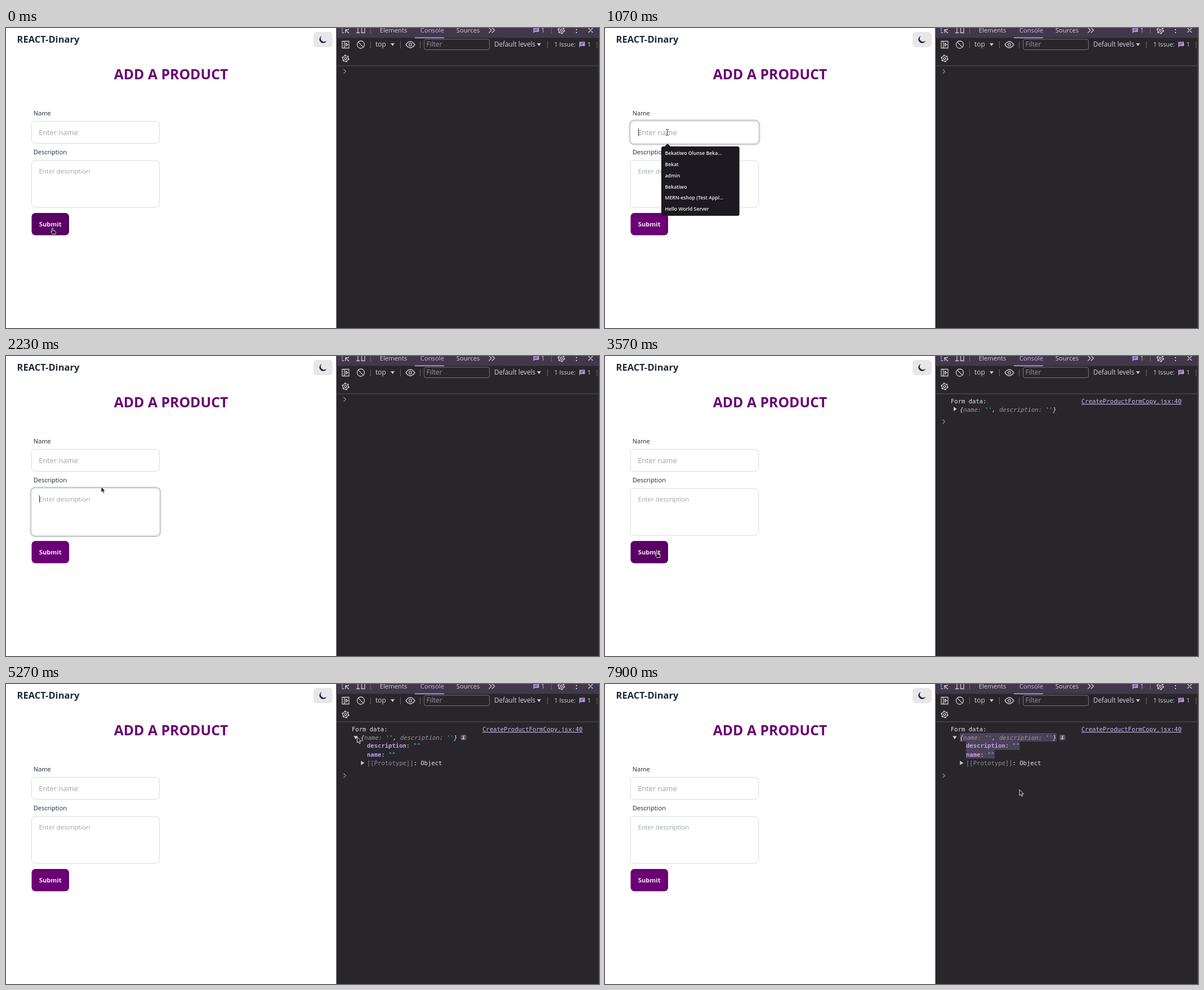
Recreate the animation shown at these times as an HTML page. Size 1053 by 532 pixels, loop 8000 ms.

```html
<!DOCTYPE html>
<html lang="en">
<head>
<meta charset="utf-8">
<title>Add a product</title>
<style>
html, body { margin: 0; width: 100%; height: 100%; overflow: hidden; background: #fff; }
svg { display: block; font-family: "Open Sans", "Noto Sans", sans-serif; }
.mono { font: 10.56px "DejaVu Sans Mono", monospace; white-space: pre; fill: #e6e3e8; }
.line { fill: none; stroke: #cfc8d6; stroke-width: 1.3; }
.rule { stroke: #67606d; }
.field { fill: #fff; stroke: #d8dbe0; }
.ring { fill: none; stroke: #c4c6cb; stroke-width: 1.8; }
.hint { fill: #9ca3af; }
.key { fill: #9a949f; }
.str { fill: #55bdec; }
.prop { fill: #bf9fef; font-weight: bold; }
</style>
</head>
<body>
<svg width="1053" height="532" viewBox="0 0 1053 532">
  <defs>
    <g id="gear" class="line">
      <circle r="4.8"/><circle r="1.9"/>
      <circle r="6" stroke-dasharray="2.8 3.483"/>
    </g>
    <g id="bubble">
      <path d="M0 0h10v7.6h-7.6l-2.4 2.4z" fill="#b497de"/>
      <path d="M2 2.5h6M2 5h4" stroke="#3b3145"/>
    </g>
    <path id="down" d="M0 0h7l-3.5 5z" fill="#cfc8d6"/>
  </defs>

  <!-- page -->
  <rect width="1053" height="532" fill="#fff"/>
  <text x="19.5" y="26" font-size="16.5" font-weight="700" fill="#1f2937">REACT-Dinary</text>
  <rect x="546" y="7" width="34" height="27" rx="6" fill="#e7e7e9"/>
  <path d="M560.6 14a6.6 6.6 0 1 0 8.6 8.6a6 6 0 0 1-8.6-8.6z" fill="#1f2940"/>
  <text x="293" y="90.5" font-size="24.8" font-weight="700" text-anchor="middle" fill="#6b0075">ADD A PRODUCT</text>
  <g font-size="11.1" font-weight="500" fill="#1f2937">
    <text x="48.7" y="155">Name</text>
    <text x="48.7" y="224">Description</text>
  </g>
  <rect class="field" x="45.5" y="165.5" width="227" height="39" rx="6.5"/>
  <rect class="field" x="45.5" y="235" width="227" height="83" rx="6.5"/>
  <text class="hint" x="58.3" y="189.5" font-size="12.8">Enter name</text>
  <text class="hint" x="58.5" y="258" font-size="11.4">Enter description</text>
  <rect id="nameRing" class="ring" x="43.5" y="163.5" width="231" height="43" rx="8.5"/>
  <rect id="textRing" class="ring" x="43.5" y="233" width="231" height="87" rx="8.5"/>
  <path id="nameCaret" d="M59.5 178v14" stroke="#333"/>
  <path id="textCaret" d="M59.5 247v13" stroke="#333"/>
  <rect id="button" x="45.5" y="328" width="66.5" height="39.5" rx="6.5"/>
  <text x="78.7" y="352.3" font-size="11.2" font-weight="700" text-anchor="middle" fill="#f1e4f3">Submit</text>
  <g id="popup" font-size="8.7" font-weight="600" fill="#f1eff3">
    <path d="M105.5 210.5l5.5-5.5 5.5 5.5z" fill="#1c1a20"/>
    <rect x="100" y="210" width="138.7" height="123" rx="3.5" fill="#1c1a20"/>
  </g>

  <!-- developer tools -->
  <rect x="586.5" width="466.5" height="532" fill="#28262b"/>
  <rect x="586.5" width="466.5" height="17.5" fill="#42384b"/>
  <path d="M1052.5 18v514" stroke="#3b383f"/>
  <path d="M587 67h466" stroke="#56515b"/>
  <rect x="726" y="16.7" width="52" height="1.4" fill="#cfb0f5"/>
  <path class="rule" d="M647.5 0v10M968.5 0v10M647.5 23v13M700.5 23v13M735.5 23v13M961.5 23v13M1049.5 23v13"/>
  <g font-size="11.3" fill="#d6d0dc">
    <text x="663.7" y="8">Elements</text>
    <text x="735.7" y="8" fill="#d0b3f5">Console</text>
    <text x="799.8" y="8">Sources</text>
    <text x="950.5" y="8" font-size="10.5">1</text>
    <text x="656" y="33" font-size="11.9">top</text>
    <text x="867" y="33" font-size="11.7">Default levels</text>
    <text x="973.5" y="33" font-size="10.8">1 Issue:</text>
    <text x="1032.5" y="33" font-size="10.5">1</text>
  </g>
  <rect x="742.5" y="20" width="116" height="18.5" rx="3" fill="none" stroke="#77717c"/>
  <text x="746.5" y="33" font-size="11.9" fill="#99939e">Filter</text>
  <use href="#down" x="683" y="27"/>
  <use href="#down" x="943" y="27"/>
  <use href="#bubble" x="936.5" y="-.5"/>
  <use href="#bubble" x="1018" y="24.5"/>
  <use href="#gear" x="986" y="4"/>
  <use href="#gear" x="603" y="54"/>
  <g class="line">
    <path d="M597 0v8.5h3.5M609 0v1" stroke-dasharray="2 1.2"/>
    <path d="M609 9.5l-6-6M603 9v-6h6"/>
    <path d="M625 0v8.5M622 8.5h6.5M631.5 0v8.5h5.5v-8.5"/>
    <path d="M857.5-.5l4.5 4.5-4.5 4.5M863-.5l4.5 4.5-4.5 4.5M1034 0l8 8M1042 0l-8 8"/>
    <path d="M597 23.5h12v12h-12zM600.8 23.5v12M603.5 26.8l3.5 2.7-3.5 2.7z"/>
    <circle cx="630" cy="29.5" r="6.5"/><path d="M625.4 24.9l9.2 9.2"/>
    <path d="M710 29.5q8-11 16 0q-8 11-16 0z"/><circle cx="718" cy="29.5" r="2.3"/>
  </g>
  <path d="M1012 2h2v2h-2zM1012 7h2v2h-2z" fill="#cfc8d6"/>
  <g id="selection" fill="#4c4257"></g>
  <g id="log" class="mono">
    <text x="614" y="84">Form data:</text>
    <text x="846" y="84" fill="#cdb5ea" text-decoration="underline">CreateProductFormCopy.jsx:40</text>
    <text x="630" y="98.5" font-style="italic">{<tspan class="key">name: </tspan><tspan class="str">''</tspan>, <tspan class="key">description: </tspan><tspan class="str">''</tspan>}</text>
    <path id="closed" d="M619 90.3l6 3.7-6 3.7z" fill="#cfc8d6"/>
  </g>
  <g id="tree" class="mono">
    <path d="M617.3 92.3h7.4l-3.7 5.6z" fill="#cfc8d6"/>
    <rect x="807" y="90" width="10.5" height="9.5" rx="2" fill="#5d526b"/>
    <text x="809.6" y="97.9" font-size="9" font-weight="bold" font-style="italic">i</text>
    <text x="641" y="113.3"><tspan class="prop">description</tspan>: <tspan class="str">""</tspan></text>
    <text x="641" y="128.8"><tspan class="prop">name</tspan>: <tspan class="str">""</tspan></text>
    <path d="M630.3 136.2l6 3.8-6 3.8z" fill="#cfc8d6"/>
    <text x="641" y="144.3"><tspan fill="#8d8792">[[Prototype]]</tspan>: Object</text>
  </g>
  <path id="prompt" d="M599.5-3.7l4 3.7-4 3.7" fill="none" stroke="#8f83b0" stroke-width="1.2"/>

  <!-- pointers -->
  <path id="arrow" d="M0 0v10l2.3-2 1.6 3.6 1.8-.8-1.6-3.4h3.2z" fill="#1b1a1d" stroke="#f2f2f2" stroke-width=".9"/>
  <path id="hand" d="M0 0c.9 0 1.1.6 1.1 1.2v3.6l3.8.9c1 .3 1.3 1 1.1 2l-.7 3.3h-5.2l-2.6-3.6c-.4-.9.5-1.3 1.1-.7l.4.5v-6c0-.6.3-1.2 1-1.2z" fill="#1b1a1d" stroke="#f2f2f2" stroke-width=".9"/>
  <path id="beam" d="M-2.5-5.5q2.5 0 2.5 1.5v8q0 1.5-2.5 1.5M2.5-5.5q-2.5 0-2.5 1.5M2.5 5.5q-2.5 0-2.5-1.5" fill="none" stroke="#333"/>
</svg>
<script>
const LOOP = 8000, CHAR = 6.357, SELECT_LAG = 80;
const FOCUS_NAME = 1070, FOCUS_TEXT = 1900, SUBMIT = 3270, LOGGED = 3370, EXPAND = 5030, PRESS = 6385, RELEASE = 7400;
const $ = id => document.getElementById(id);
const show = (id, on) => $(id).setAttribute('visibility', on ? 'visible' : 'hidden');
const between = (v, lo, hi) => v >= lo && v < hi;
const ramp = (t, start, length) => Math.min(1, Math.max(0, (t - start) / length));

// pointer strokes: start, end, points passed at equal intervals
const REST = [82.5, 354.5];
const strokes = [
  [130, 900, [67, 300], [127, 178], [110.5, 185]],
  [1130, 1370, [87, 185]],
  [1530, 2230, [298, 335], [220, 285], [169, 232]],
  [2300, 3130, [385, 295], [150, 348], [92, 346.5]],
  [3670, 4130, [623.5, 94]],
  [5430, 5830, [715, 120]],
  [6000, 6770, [728, 126], [695, 126], [675.5, 122], [645, 106]],
  [6870, 7300, [643, 91], [631.5, 90]],
  [7630, 7900, [736, 187.5]]
];

function pointer(t) {
  let position = REST;
  for (const [start, end, ...points] of strokes) {
    if (t <= start) break;
    const leg = (end - start) / points.length;
    points.forEach((point, i) => {
      const k = ramp(t, start + i * leg, leg);
      position = position.map((v, axis) => v + (point[axis] - v) * k);
    });
  }
  return position;
}

function pointerKind(x, y, popupOpen) {
  if (popupOpen && between(x, 100, 239) && between(y, 210, 333)) return 'arrow';
  if (between(x, 45, 112) && between(y, 328, 368)) return 'hand';
  if (between(x, 46, 272) && (between(y, 166, 205) || between(y, 236, 318))) return 'beam';
  return 'arrow';
}

const svgNode = (name, parent) =>
  parent.appendChild(document.createElementNS('http://www.w3.org/2000/svg', name));
const setAll = (node, values) => {
  for (const name in values) node.setAttribute(name, values[name]);
};

['Bekatiwo Olunse Beka...', 'Bekat', 'admin', 'Bekatiwo', 'MERN-eshop (Test Appl...', 'Hello World Server']
  .forEach((label, i) => {
    const item = svgNode('text', $('popup'));
    setAll(item, { x: 106.5, y: 225.2 + i * 19.8 });
    item.textContent = label;
  });

// selectable lines: left edge and character count
const lines = [[630, 27], [641, 15], [641, 8]];
const bars = lines.map(() => svgNode('rect', $('selection')));

function drawSelection(t) {
  show('selection', t >= PRESS);
  const [x, y] = pointer(Math.min(t, RELEASE) - SELECT_LAG);
  const first = y < 102 ? 0 : y < 117 ? 1 : 2;
  lines.forEach(([left, count], i) => {
    const column = Math.min(count, Math.max(0, Math.round((x - left) / CHAR)));
    const skip = i < first ? count : i === first ? column : 0;
    setAll(bars[i], { x: left + skip * CHAR, y: 87 + i * 15, width: (count - skip) * CHAR, height: 15 });
  });
}

function draw(t) {
  const inName = between(t, FOCUS_NAME, FOCUS_TEXT), inText = between(t, FOCUS_TEXT, SUBMIT);
  const blink = start => (t - start) % 1000 < 500;
  show('nameRing', inName);
  show('popup', inName);
  show('textRing', inText);
  show('nameCaret', inName && blink(FOCUS_NAME));
  show('textCaret', inText && blink(FOCUS_TEXT));

  const hover = 1 - ramp(t, 250, 200) + ramp(t, 3040, 200) - ramp(t, 3700, 200);
  $('button').setAttribute('fill', `rgb(${107 - 17 * hover},0,${117 - 17 * hover})`);

  const logged = t >= LOGGED, open = t >= EXPAND;
  show('log', logged);
  show('closed', logged && !open);
  show('tree', open);
  $('prompt').setAttribute('transform', `translate(0 ${open ? 162.5 : logged ? 116.5 : 77})`);
  drawSelection(t);

  const [x, y] = pointer(t), kind = pointerKind(x, y, inName);
  for (const id of ['arrow', 'hand', 'beam']) show(id, id === kind);
  $(kind).setAttribute('transform', `translate(${x} ${y})`);
}

function tick() {
  draw(performance.now() % LOOP);
  requestAnimationFrame(tick);
}
tick();
</script>
</body>
</html>
```
